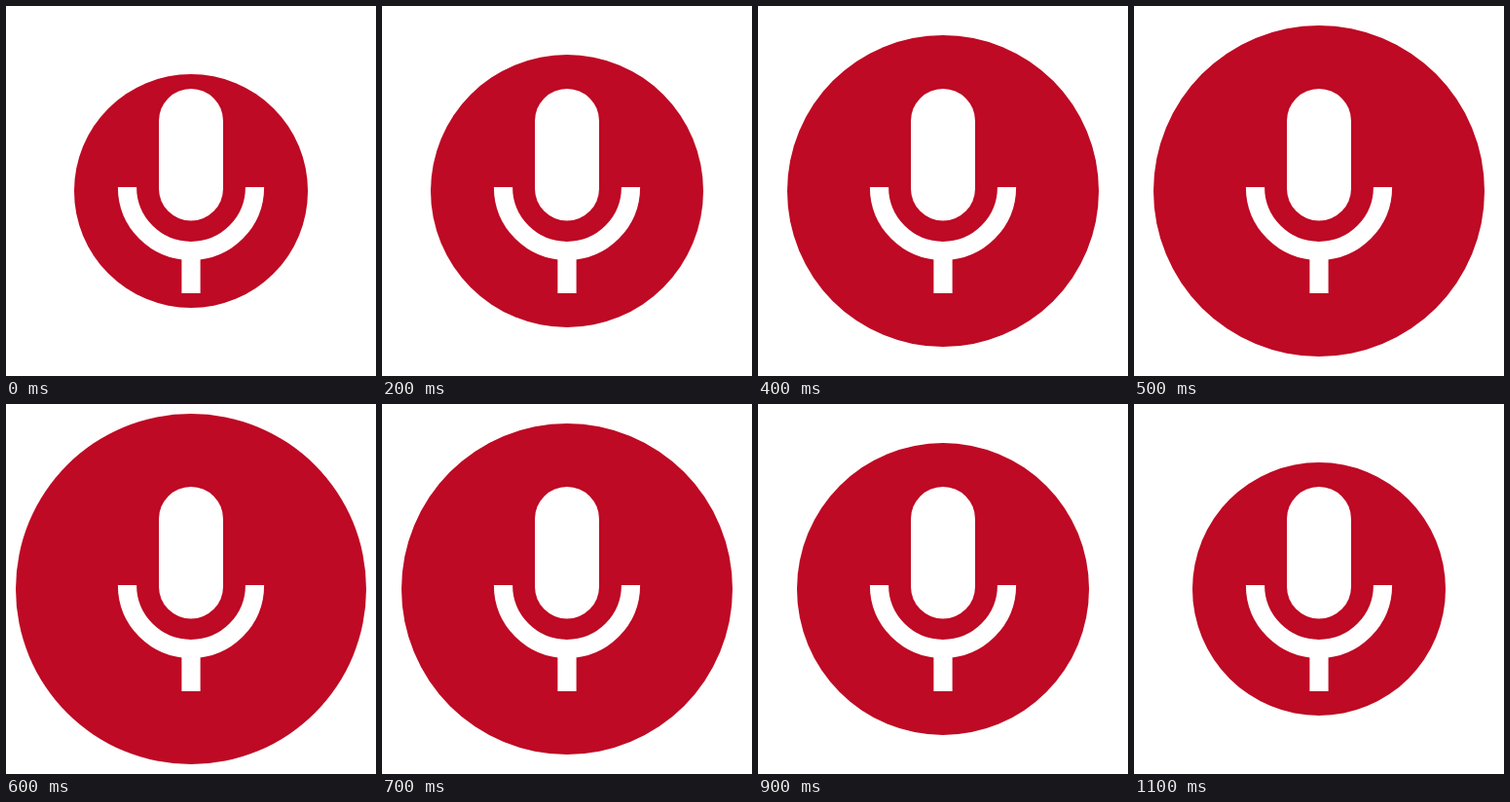
Animation of 380x380 px, one loop 1.2 s. Source, as an HTML page:

```html
<!DOCTYPE html>
<html lang="en">
<head>
<meta charset="utf-8">
<title>Pulsing microphone</title>
<style>
  html, body { margin: 0; width: 100%; height: 100%; overflow: hidden; background: #fff; }
  svg { display: block; width: 100%; height: 100%; }
  .disc { fill: #be0a24; r: 120px; animation: pulse 1200ms infinite; }
  /* The radius moves 10px every 100ms, out and back. */
  @keyframes pulse {
    0%   { r: 120px; animation-timing-function: steps(6, end); }
    50%  { r: 180px; animation-timing-function: steps(6, end); }
    100% { r: 120px; }
  }
</style>
</head>
<body>
<svg viewBox="0 0 380 380">
  <circle class="disc" cx="190" cy="190" r="120"/>
  <rect x="157" y="85" width="66" height="135.5" rx="33" fill="#fff"/>
  <path d="M124.5 186a65.5 65.5 0 0 0 131 0M190 252V295" fill="none" stroke="#fff" stroke-width="19.2"/>
</svg>
</body>
</html>
```
